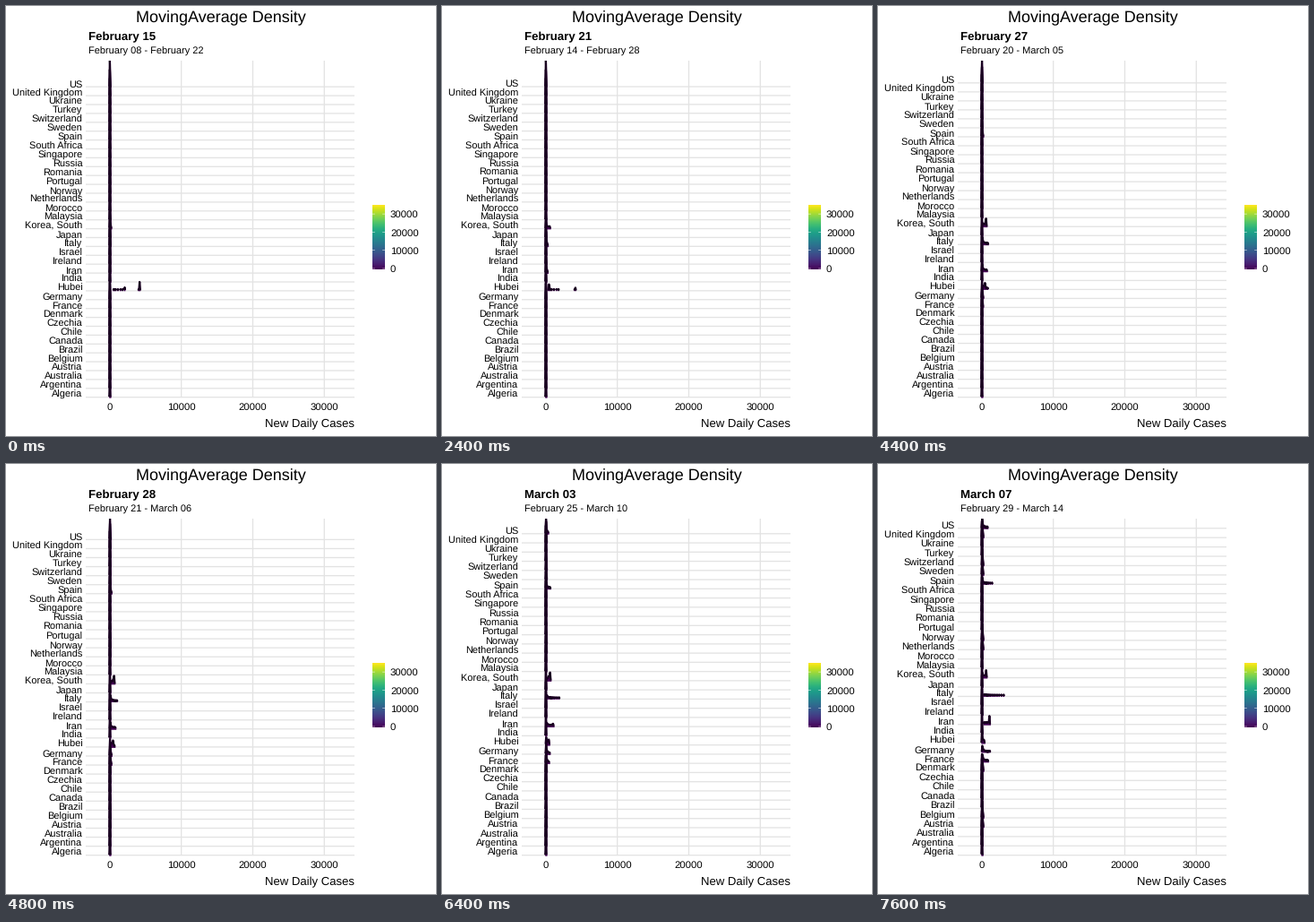
A matplotlib script for the animation above (8 s loop, 480x480 px).

```python
import numpy as np
import matplotlib
import matplotlib.pyplot as plt
from matplotlib.animation import FuncAnimation

matplotlib.rcParams["font.family"] = ["Liberation Sans"]
matplotlib.rcParams["text.hinting"] = "none"

SIZE = 480
FRAMES, INTERVAL = 20, 400
DAYS_PER_FRAME = 1.08
LEFT, RIGHT, TOP, BOTTOM = 89, 389, 61, 436.7
ZERO_X, PX_PER_CASE = 115.9, 0.00798
BANDWIDTH, MIN_DENSITY, OVERLAP = 35, 0.01, 2.95
GRID = "#e3e3e3"
PURPLE, OUTLINE = "#440154", "#190020"

COUNTRIES = (
    "Algeria/Argentina/Australia/Austria/Belgium/Brazil/Canada/Chile/Czechia/"
    "Denmark/France/Germany/Hubei/India/Iran/Ireland/Israel/Italy/Japan/"
    "Korea, South/Malaysia/Morocco/Netherlands/Norway/Portugal/Romania/Russia/"
    "Singapore/South Africa/Spain/Sweden/Switzerland/Turkey/Ukraine/"
    "United Kingdom/US"
).split("/")

# Bell-shaped waves: peak of daily cases, day of the peak, width in days.
# Day 0 is February 08.
WAVES = {
    "Italy": (6320, 48.5, 11.2),
    "Spain": (10600, 55, 10),
    "Germany": (4725, 52, 10),
    "France": (2600, 50, 10),
    "US": (7070, 56, 10),
    "Iran": (1080, 33, 7.3),
    "Korea, South": (623, 22.5, 5.2),
}
LATE_STARTERS = {"United Kingdom", "Switzerland", "Netherlands", "Sweden",
                 "Norway", "Denmark", "Belgium", "Austria"}

cases = np.arange(-300, 4700, 20)
cases_x = ZERO_X + cases * PX_PER_CASE


def px(width):
    return width * 0.72


def falloff(day, middle, scale):
    return 1 / (1 + np.exp((day - middle) / scale))


def daily_cases(country, day):
    if country == "Hubei":
        # A one-day batch lifts the weekly average for seven days.
        batch = 2100 * ((day >= 2) & (day <= 8))
        return batch + 1600 * falloff(day, 10.6, 1.1) + 480 * falloff(day, 23, 2.5)
    if country in WAVES:
        peak, middle, width = WAVES[country]
        return peak * np.exp(-0.5 * ((day - middle) / width) ** 2)
    level = 180 if country in LATE_STARTERS else 30
    return level * np.exp(-0.17 * (35 - day))


def density(country, days):
    values = daily_cases(country, days)[:, None]
    return np.exp(-0.5 * ((cases - values) / BANDWIDTH) ** 2).mean(axis=0)


def date_text(day):
    date = 8 + day
    return f"February {date:02d}" if date <= 29 else f"March {date - 29:02d}"


fig = plt.figure(figsize=(4.8, 4.8), dpi=100, facecolor="white")
ax = fig.add_axes([0, 0, 1, 1])
ax.axis("off")


def label(x, y, text, size, **kw):
    return ax.text(x, y, text, fontsize=px(size), va="baseline",
                   color="black", **kw)


def line(x, y, color, width, **kw):
    return ax.plot(x, y, color=color, lw=px(width), snap=False,
                   solid_capstyle="butt", **kw)[0]


label(240, 17, "MovingAverage Density", 18, ha="center")
title = label(92, 38, "", 13.3, weight="bold")
subtitle = label(92, 54, "", 11)
label(RIGHT, 470, "New Daily Cases", 13.1, ha="right")

ax.imshow(np.linspace(1, 0, 256)[:, None], cmap="viridis", aspect="auto",
          extent=(409, 423, 294.3, 222.3), zorder=5)
for value in range(0, 40000, 10000):
    x = ZERO_X + value * PX_PER_CASE
    y = 293 - value * 0.00203
    line([x, x], [TOP, BOTTOM], GRID, 1.3, zorder=1)
    label(x, 451, str(value), 11.4, ha="center")
    label(429, y + 4, str(value), 11.4)
    for x0 in (409, 420.2):
        line([x0, x0 + 2.8], [y, y], "white", 0.5, zorder=6)

ax.set_xlim(0, SIZE)
ax.set_ylim(SIZE, 0)

panel = plt.Rectangle((LEFT, TOP), RIGHT - LEFT, BOTTOM + 2 - TOP,
                      transform=ax.transData)
rows = []
for i, country in enumerate(COUNTRIES):
    grid_line = line([], [], GRID, 1.3, zorder=1)
    ridge = line([], [], OUTLINE, 2.2, zorder=4 - i / 100)
    ridge.set_clip_path(panel)
    rows.append((grid_line, ridge, label(85.5, 0, country, 11, ha="right")))
fills = []


def draw(frame):
    day = int(DAYS_PER_FRAME * frame + 0.5)
    title.set_text(date_text(day + 7))
    subtitle.set_text(f"{date_text(day)} - {date_text(day + 14)}")

    # The rows spread until the highest ridge touches the top of the panel.
    days = np.arange(day, day + 15)
    ridges = [OVERLAP * density(country, days) for country in COUNTRIES]
    highest = max(i + r.max() for i, r in enumerate(ridges))
    spacing = (BOTTOM - TOP) / highest

    while fills:
        fills.pop().remove()
    for i, (grid_line, ridge, name) in enumerate(rows):
        y = BOTTOM - i * spacing
        visible = ridges[i] >= OVERLAP * MIN_DENSITY
        heights = np.where(visible, y - spacing * ridges[i], np.nan)
        grid_line.set_data([LEFT, RIGHT], [y, y])
        ridge.set_data(cases_x, heights)
        name.set_y(y + 0.3)
        fill = ax.fill_between(cases_x, y, heights, color=PURPLE, lw=px(0.8),
                               zorder=4 - i / 100 - 0.005)
        fill.set_clip_path(panel)
        fills.append(fill)
    return []


anim = FuncAnimation(fig, draw, frames=FRAMES, interval=INTERVAL,
                     init_func=lambda: [], repeat=True, repeat_delay=0)
plt.show()
```
